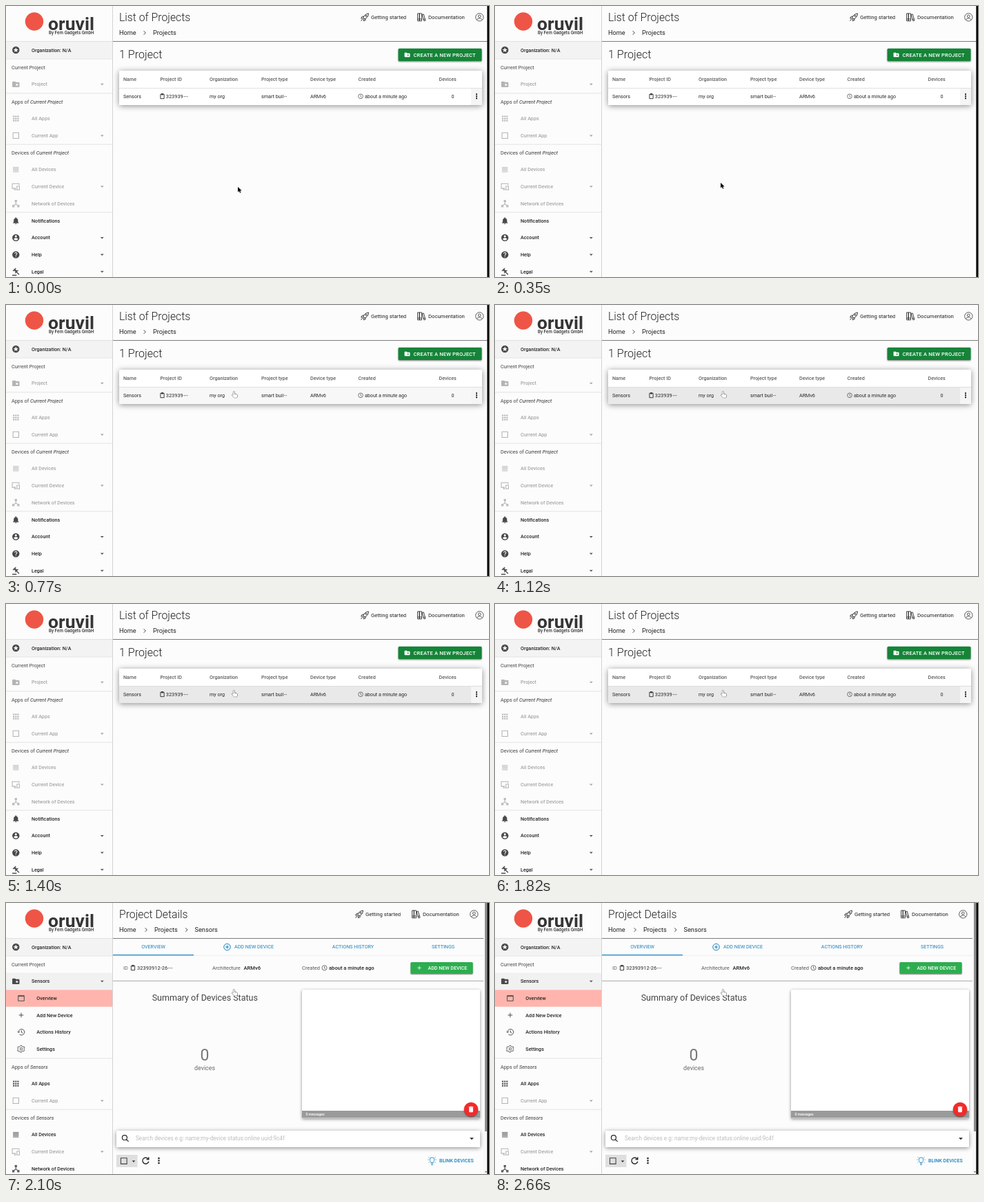
An HTML page with a canvas that plays this animation: 700x394 px, repeating every 2.73 s.

```html
<!DOCTYPE html>
<html lang="en">
<head>
<meta charset="utf-8">
<title>Project dashboard</title>
<style>
html, body { margin: 0; width: 100%; height: 100%; overflow: hidden; background: #fcfcfc; }
canvas { display: block; width: 700px; height: 394px; }
</style>
</head>
<body>
<canvas id="stage" width="700" height="394"></canvas>
<script>
const ctx = document.getElementById('stage').getContext('2d');
const LOOP = 2730, STEP = 70;
const PAGE_OPEN = 1890, STRIP_OFF = 910, STRIP_ON = 2030;
const INK = '#262626', MUTED = '#a6a6a6', BLUE = '#1682bb', LINE = '#dedede', PAPER = '#fcfcfc';
const ROW = 24.7;

// Icons live on a 24 unit grid; a number in the second slot is a stroke width.
const DISC = 'M12 2a10 10 0 1 0 0 20a10 10 0 0 0 0-20z';
const FOLDER = 'M20 6h-8l-2-2H4a2 2 0 0 0-2 2v12a2 2 0 0 0 2 2h16a2 2 0 0 0 2-2V8a2 2 0 0 0-2-2z';
const ICONS = {
  star: [DISC + 'M16.2 18L12 15.5 7.8 18l1.1-4.8-3.7-3.2 4.9-.4L12 5l1.9 4.6 4.9.4-3.7 3.2z'],
  folder: [FOLDER + 'M15 9l1.2 2.8 3 .3-2.3 2 .7 2.9-2.6-1.5-2.6 1.5.7-2.9-2.3-2 3-.3z'],
  newFolder: [FOLDER + 'M14 10h2v2h2v2h-2v2h-2v-2h-2v-2h2z'],
  apps: [[4, 10, 16].map(y => [4, 10, 16].map(x => `M${x} ${y}h4v4h-4z`).join('')).join('')],
  box: ['M4 4h16v16H4z', 2],
  list: [[5, 9, 13, 17].map(y => `M4 ${y}h16v2H4z`).join('')],
  devices: ['M21 8V4H2v13h10M7 21h6M9 17v4M15 11h7v10h-7z', 2],
  hub: ['M12 5v8L5 19M12 13l7 6M10 3h4v4h-4zM3 17h4v4H3zM17 17h4v4h-4z', 2],
  bell: ['M12 22a2 2 0 0 0 2-2h-4a2 2 0 0 0 2 2zm6-6v-5c0-3.1-1.6-5.6-4.5-6.3V4a1.5 1.5 0 0 0-3 0v.7C7.6 5.4 6 7.9 6 11v5l-2 2v1h16v-1z'],
  account: [DISC + 'M12 5a3 3 0 1 1 0 6 3 3 0 0 1 0-6zm0 14.2a7.2 7.2 0 0 1-6-3.2c0-2 4-3.1 6-3.1s6 1.1 6 3.1a7.2 7.2 0 0 1-6 3.2z'],
  help: [DISC + 'M13 19h-2v-2h2zm2.1-7.8-.9.9c-.7.8-1.2 1.4-1.2 2.9h-2v-.5c0-1.1.5-2.1 1.2-2.8l1.2-1.3c.4-.3.6-.8.6-1.4a2 2 0 0 0-4 0H8a4 4 0 0 1 8 0c0 .9-.4 1.7-.9 2.2z'],
  gavel: ['M2 22h12M4 10l8-8M10 16l8-8M7 7l6 6M9 5l6 6M12 11l9 9', 2.5],
  window: ['M3 4h18v16H3zM3 6h18', 2],
  plus: ['M12 5v14M5 12h14', 2],
  history: ['M4 12a9 9 0 1 1 3 6.7M1 10l3 4 4-4M13 7v6l4 2', 2],
  gear: ['M12 8.5a3.5 3.5 0 1 0 0 7a3.5 3.5 0 0 0 0-7zM10 2h4l1 3 3 1 3-1 1 4-2 3 2 3-2 4-3-1-3 1-1 3h-4l-1-3-3-1-3 1-1-4 2-3-2-3 2-4 3 1 2-1z', 1.8],
  rocket: ['M8 14c1-6 6-11 14-12c0 8-5 13-11 15zM8 14l3 3M9 10H5l-3 5h5M14 16v4l-5 2v-5M6 17l-4 5M15.5 6.5a2 2 0 1 0 .1 0z', 1.7],
  books: ['M2 2h5v20H2zM7 2h6v20H7zM2 17h11M14 5l4-1 5 17-4 1zM17 18l5-1', 1.6],
  person: ['M12 1.5a10.5 10.5 0 1 0 0 21a10.5 10.5 0 0 0 0-21zM12 6a3.5 3.5 0 1 0 0 7a3.5 3.5 0 0 0 0-7zM5 19c2-5 12-5 14 0', 1.6],
  clipboard: ['M5 4h14v17H5zM9 2h6v4H9z', 2.4],
  clock: ['M12 2.5a9.5 9.5 0 1 0 0 19a9.5 9.5 0 0 0 0-19zM12 6v7l4 3', 2],
  dots: ['M10 4h4v4h-4zM10 10h4v4h-4zM10 16h4v4h-4z'],
  caret: ['M7 10l5 5 5-5z'],
  chevron: ['M9 6l6 6-6 6', 2],
  addRound: ['M12 2.5a9.5 9.5 0 1 0 0 19a9.5 9.5 0 0 0 0-19zM12 7v10M7 12h10', 2],
  search: ['M10 3.5a6.5 6.5 0 1 0 0 13a6.5 6.5 0 0 0 0-13zM14.5 14.5l6 6', 2.2],
  refresh: ['M19 8a8 8 0 1 0 1 6M20 3v6h-6', 2.4],
  bulb: ['M9 17c0-3-3-4-3-8a6 6 0 0 1 12 0c0 4-3 5-3 8zM9 20h6M10 23h4M1 9h2M21 9h2M3 2l2 2M21 2l-2 2M3 17l2-2M21 17l-2-2', 1.6],
  trash: ['M6 19a2 2 0 0 0 2 2h8a2 2 0 0 0 2-2V7H6zM19 4h-3.5l-1-1h-5l-1 1H5v2h14z']
};
for (const key in ICONS) ICONS[key][0] = new Path2D(ICONS[key][0]);

function icon(name, x, y, size = 13, color = INK) {
  const [path, stroke] = ICONS[name];
  ctx.save();
  ctx.translate(x - size / 2, y - size / 2);
  ctx.scale(size / 24, size / 24);
  ctx.fillStyle = ctx.strokeStyle = color;
  if (stroke) { ctx.lineWidth = stroke; ctx.stroke(path); }
  else ctx.fill(path, 'evenodd');
  ctx.restore();
}

function rect(x, y, w, h, color) {
  ctx.fillStyle = color;
  ctx.fillRect(x, y, w, h);
}

function disc(x, y, r, color) {
  ctx.fillStyle = color;
  ctx.beginPath();
  ctx.arc(x, y, r, 0, Math.PI * 2);
  ctx.fill();
}

function card(x, y, w, h, color = '#fff', blur = 5, radius = 1.5) {
  ctx.save();
  ctx.shadowColor = 'rgba(0,0,0,.45)';
  ctx.shadowBlur = blur;
  ctx.shadowOffsetY = 1.2;
  ctx.fillStyle = color;
  ctx.beginPath();
  ctx.roundRect(x, y, w, h, radius);
  ctx.fill();
  ctx.restore();
}

// y is the middle of the capitals; returns the text width
function text(str, x, y, size = 7.2, color = INK, weight = 400, align = 'left', style = 'normal') {
  ctx.font = `${style} ${weight} ${size}px Roboto, sans-serif`;
  ctx.textAlign = align;
  ctx.fillStyle = color;
  ctx.fillText(str, x, y + size * .355);
  return ctx.measureText(str).width;
}

function cutText(str, x, y, size, dots = 3) {
  const end = x + text(str, x, y, size) + 1.6;
  for (let i = 0; i < dots; i++) disc(end + i * 2.3, y + .3, .55, INK);
}

function item(name, label, y, { muted, caret, child } = {}) {
  const color = muted ? MUTED : INK;
  icon(name, child ? 22 : 14.3, y, child ? 11.5 : 12.5, muted ? '#b4b4b4' : '#484848');
  text(label, child ? 44.3 : 37, y, 7.2, color, 500);
  if (caret) icon('caret', 139.3, y, 12, muted ? MUTED : '#555');
}

function heading(label, subject, y) {
  const w = text(label, 8, y, 7.3, '#444');
  if (subject) text(subject, 8 + w, y, 7.3, '#333', 400, 'left', 'italic');
}

const divider = y => rect(0, y, 154, .8, LINE);

function deviceMenu(y, subject, open) {
  divider(y - 12.5);
  heading('Apps of ', subject, y);
  item('apps', 'All Apps', y + ROW, { muted: !open });
  item('box', 'Current App', y + ROW * 2, { muted: true, caret: true });
  divider(y + ROW * 2.5);
  heading('Devices of ', subject, y + ROW * 3);
  item('list', 'All Devices', y + ROW * 4, { muted: !open });
  item('devices', 'Current Device', y + ROW * 5, { muted: true, caret: true });
  item('hub', 'Network of Devices', y + ROW * 6, { muted: !open });
  divider(y + ROW * 6.5);
  item('bell', 'Notifications', y + ROW * 7 + .3);
  item('account', 'Account', y + ROW * 8 + .3, { caret: true });
  item('help', 'Help', y + ROW * 9 + .3, { caret: true });
  item('gavel', 'Legal', y + ROW * 10 + .3, { caret: true });
}

function sidebar(open, t) {
  disc(41, 22.5, 13.2, '#ee5546');
  text('oruvil', 61, 26, 26.5, '#353535', 700);
  text('By Fern Gadgets GmbH', 62, 39.2, 6.3, '#333', 500);
  rect(0, 51.5, 154, 25.5, '#f3f3f3');
  rect(0, 51, 154, .8, LINE);
  divider(76.6);
  item('star', 'Organization: N/A', 64);
  heading('Current Project', '', 89);
  if (!open) {
    item('folder', 'Project', 113.8, { muted: true, caret: true });
    deviceMenu(139, 'Current Project', false);
  } else {
    rect(0, 101.5, 154, 24.7, '#f1f1f1');
    item('folder', 'Sensors', 113.8, { caret: true });
    const hidden = 22 * Math.pow(1 - Math.min(1, (t - PAGE_OPEN) / 210), 2.5);
    ctx.save();
    ctx.beginPath();
    ctx.rect(0, 126, 154, 99 - hidden);
    ctx.clip();
    rect(0, 126.3, 154, 24.5, '#ffb5ad');
    item('window', 'Overview', 138.5, { child: true });
    item('plus', 'Add New Device', 163, { child: true });
    item('history', 'Actions History', 187.7, { child: true });
    item('gear', 'Settings', 212.2, { child: true });
    ctx.restore();
    deviceMenu(238 - hidden, 'Sensors', true);
  }
  rect(154, 0, .9, 394, '#cfcfcf');
}

function topBar(title, crumbs, shift) {
  text(title, 164, 16.2, 15.75, '#222', 300);
  crumbs.forEach(([label, x], i) => {
    text(label, x, 38.4, 9.2, '#222');
    if (i) icon('chevron', x - 12, 39, 11, '#333');
  });
  icon('rocket', 520 - shift, 16.3, 13);
  text('Getting started', 529 - shift, 16.2, 7.7, '#222');
  icon('books', 602 - shift, 16.3, 13);
  text('Documentation', 612 - shift, 16.2, 7.75, '#222');
  icon('person', 686.3 - shift, 16.3, 13, '#444');
  rect(155, 51, 545 - shift, 1, '#7c7c7c');
}

function listPage(t) {
  topBar('List of Projects', [['Home', 164], ['Projects', 213]], 0);
  text('1 Project', 164, 70.7, 16.1, '#222', 300);
  card(568.5, 61.8, 121, 18.2, '#158438', 2);
  icon('newFolder', 581.5, 71, 9.5, '#fff');
  ctx.letterSpacing = '.2px';
  text('CREATE A NEW PROJECT', 590.5, 71, 7.5, '#fff', 500);
  ctx.letterSpacing = '0px';

  card(164, 94, 526, 50, '#fff', 8);
  const hover = Math.max(0, Math.min(1, (t - 665) / 280));
  const shade = Math.round(255 - 22 * hover);
  rect(164, 119.5, 526, 24.5, `rgb(${shade},${shade},${shade})`);
  rect(674, 120, 16, 24, '#f5f5f5');
  rect(164, 119, 526, .8, '#d9d9d9');
  [['Name', 170], ['Project ID', 223.5], ['Organization', 295], ['Project type', 370],
   ['Device type', 441], ['Created', 510.5], ['Devices', 627.5]]
    .forEach(([label, x]) => text(label, x, 106.5, 7.2, '#606060', 500));
  const y = 131.3;
  text('Sensors', 170, y);
  icon('clipboard', 226.5, y, 9);
  cutText('323939', 231.8, y, 7.4);
  text('my org', 295, y);
  cutText('smart buil', 370, y, 7.2, 2);
  text('ARMv6', 441, y);
  icon('clock', 514, y, 8.5, '#444');
  text('about a minute ago', 520, y, 7.1);
  text('0', 645.5, y);
  icon('dots', 682, y, 12);
}

function scrollbar() {
  rect(692, 0, 8, 394, '#f7f7f7');
  rect(694, 0, 3, 332, '#8c8c8c');
  icon('caret', 695.5, 391, 8, '#555');
}

function detailsPage() {
  topBar('Project Details', [['Home', 164], ['Projects', 215], ['Sensors', 273.5]], 8);
  const tab = (label, x, align) => text(label, x, 63.6, 7.15, BLUE, 400, align);
  tab('OVERVIEW', 213.5, 'center');
  icon('addRound', 320.5, 64, 12, BLUE);
  tab('ADD NEW DEVICE', 331);
  tab('ACTIONS HISTORY', 503, 'center');
  tab('SETTINGS', 633.5, 'center');
  rect(155, 75.8, 537, .7, '#e8e8e8');
  rect(155, 75, 117, 1.2, BLUE);

  const y = 94.3;
  text('ID', 170, y, 7.5, '#666');
  icon('clipboard', 184, y, 9);
  cutText('32393912-26', 190, y, 7.5);
  text('Architecture', 299, y, 7.5, '#555');
  text('ARMv6', 344.5, y, 7.6, '#222', 500);
  text('Created', 429, y, 7.5, '#555');
  icon('clock', 461.5, y, 9, '#444');
  text('about a minute ago', 468, y, 7.6, '#222', 500);
  card(586.4, 86, 90.2, 16.8, '#2cae4f', 1.5);
  icon('plus', 599, y, 9.5, '#fff');
  text('ADD NEW DEVICE', 611.5, y, 7.1, '#fff', 500);
  rect(155, 112.8, 537, 1, '#a8a8a8');

  text('Summary of Devices Status', 288.3, 137.3, 12.5, '#444', 400, 'center');
  text('0', 288, 221, 23, '#777', 400, 'center');
  text('devices', 288, 239.8, 8.85, '#6a6a6a', 400, 'center');

  card(429, 126, 258, 187, '#fff', 4);
  rect(429, 302, 258, 10.5, '#9a9a9a');
  text('0 messages', 434.5, 307.1, 5, '#fff', 500);
  card(663.7, 289.7, 20.6, 20.6, '#f22b2b', 2, 10.3);
  icon('trash', 674, 300, 11.5, '#fff');

  card(160, 331, 527, 24, '#fff', 6);
  icon('search', 173, 342.3, 13);
  text('Search devices e.g: name:my-device status:online uuid:9c4f', 188, 342.2, 8.18, '#bdbdbd');
  icon('caret', 675, 342.5, 14);
  rect(160, 366, 30.5, 18, '#dfdfdf');
  icon('box', 170.8, 375, 13, '#444');
  icon('caret', 185, 375.5, 11);
  icon('refresh', 202.3, 374.6, 13.5);
  icon('dots', 221.5, 374.6, 14);
  icon('bulb', 617.5, 374.8, 13, BLUE);
  text('BLINK DEVICES', 628, 374.8, 7.1, BLUE, 500);
  scrollbar();
}

// time, x, y of the pointer tip
const PATH = [[210, 336, 263], [280, 333, 261], [350, 327, 257], [490, 322, 218], [630, 327, 158], [770, 330, 126]];
const ARROW = new Path2D('M0 0v7.6l1.8-1.6 1.3 2.8 1.3-.6-1.3-2.7h2.5z');
const HAND = new Path2D('M-.6 .6c0-1.5 1.8-1.5 1.8 0v2.8l3.2.8q1.2.3 1 1.5l-.7 3H.4l-2.7-3.2c-.7-1 .4-1.7 1.2-1l.5.6z');

function pointer(t) {
  let i = PATH.findIndex(p => p[0] > t);
  if (i < 0) i = PATH.length;
  const a = PATH[Math.max(0, i - 1)], b = PATH[Math.min(i, PATH.length - 1)];
  const k = b === a ? 0 : Math.max(0, (t - a[0]) / (b[0] - a[0]));
  const x = a[1] + (b[1] - a[1]) * k, y = a[2] + (b[2] - a[2]) * k;
  const overRow = y < 144;
  ctx.save();
  ctx.translate(x, y);
  ctx.lineWidth = .9;
  ctx.strokeStyle = overRow ? '#333' : '#fff';
  ctx.fillStyle = overRow ? '#fff' : '#000';
  const shape = overRow ? HAND : ARROW;
  ctx.stroke(shape);
  ctx.fill(shape);
  ctx.restore();
}

function draw(t) {
  const open = t >= PAGE_OPEN;
  rect(0, 0, 700, 394, PAPER);
  sidebar(open, t);
  if (open) detailsPage();
  else listPage(t);
  if (t < STRIP_OFF || t >= STRIP_ON) rect(697.3, 0, 2.7, 394, '#0a0a0a');
  pointer(t);
}

const start = performance.now();
function tick() {
  const t = (performance.now() - start) % LOOP;
  draw(Math.floor(t / STEP) * STEP);
  requestAnimationFrame(tick);
}
tick();
</script>
</body>
</html>
```
